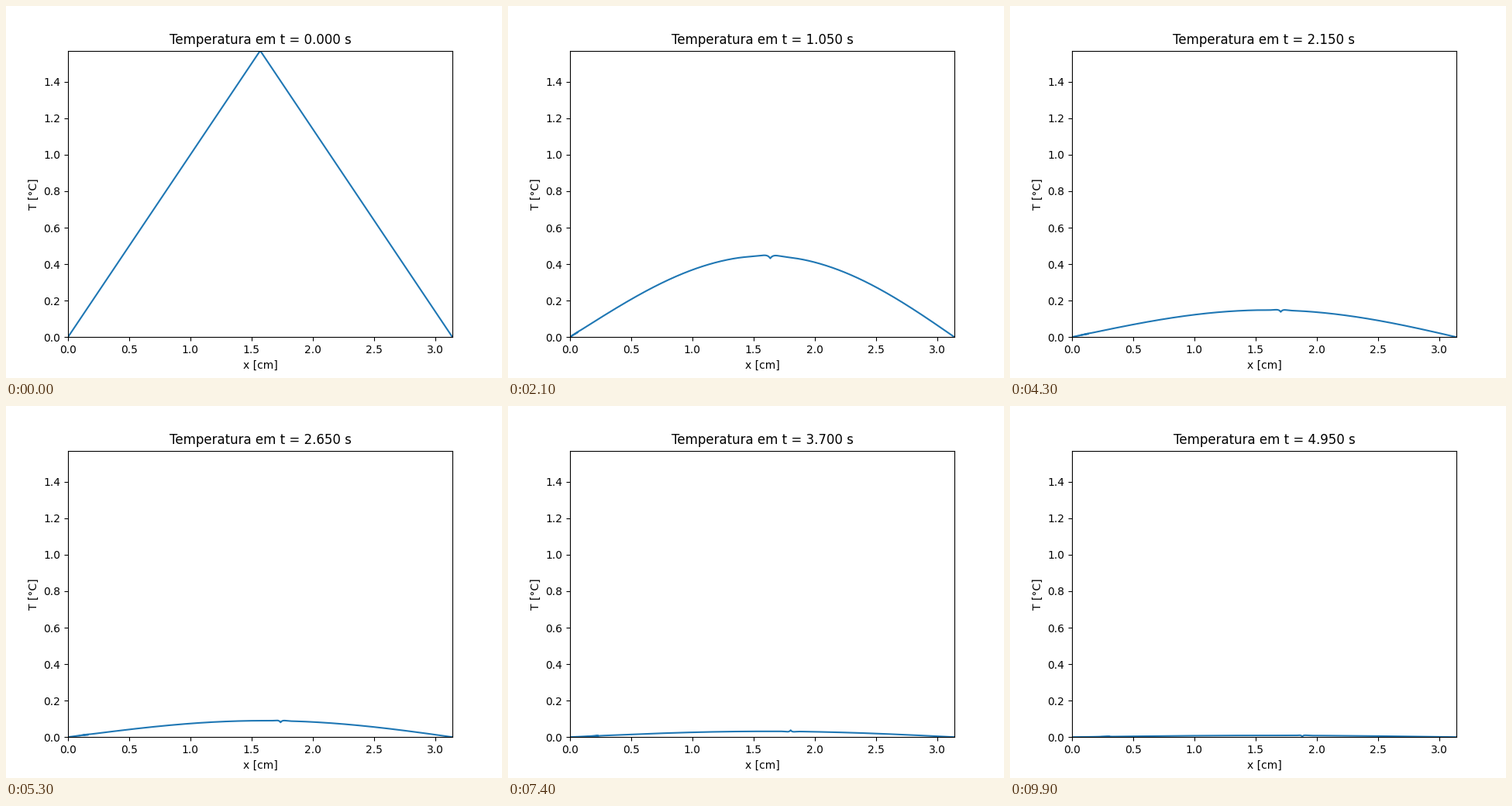
A matplotlib script for the animation above (10000 ms loop, 640 by 480 pixels).

```python
import numpy as np
import matplotlib.pyplot as plt
from matplotlib.animation import FuncAnimation

N = 1001          # grid points
STEPS = 100
DT = 0.05         # seconds per step

x = np.linspace(0, np.pi, N)
r = DT / (x[1] - x[0]) ** 2


def implicit_inverse():
    """Inverse of the implicit half of the Crank-Nicolson step."""
    n = N - 2
    off = np.full(n - 1, -r / 2)
    return np.linalg.inv(np.diag(np.full(n, 1 + r))
                         + np.diag(off, 1) + np.diag(off, -1))


def solve():
    """Crank-Nicolson heat flow whose profile drifts one cell per step."""
    inv = implicit_inverse()
    u = np.minimum(x, np.pi - x)
    u[0] = u[-1] = 0
    history = [u]
    for _ in range(STEPS - 1):
        v = np.concatenate(([0.0], u[:-1]))
        rhs = (1 - r) * v[1:-1] + r / 2 * (v[:-2] + v[2:])
        u = np.zeros(N)
        u[1:-1] = inv @ rhs
        history.append(u)
    return history


temps = solve()

fig, ax = plt.subplots(figsize=(6.4, 4.8), dpi=100)
line, = ax.plot(x, temps[0])
ax.set_xlim(0, np.pi)
ax.set_ylim(0, np.pi / 2)
ax.set_xlabel("x [cm]")
ax.set_ylabel("T [°C]")
title = ax.set_title("")


def update(i):
    line.set_ydata(temps[i])
    title.set_text(f"Temperatura em t = {i * DT:.3f} s")
    return line, title


anim = FuncAnimation(fig, update, frames=STEPS, interval=100,
                     repeat=True, repeat_delay=0, blit=False)
plt.show()
```
